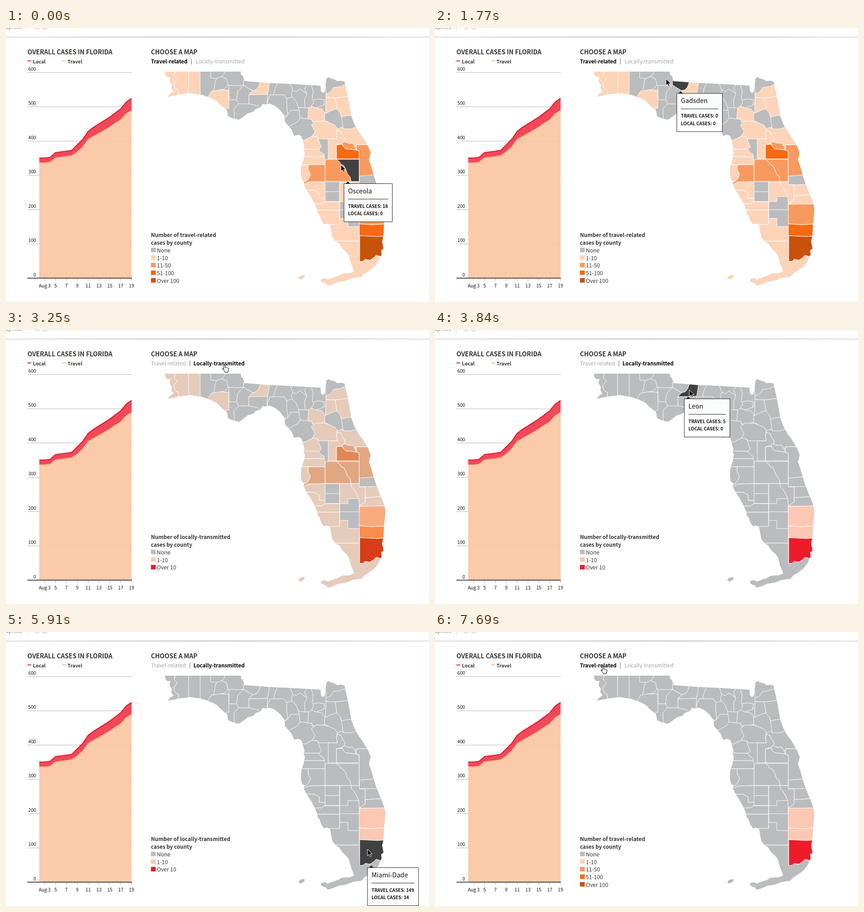
An HTML page for the animation above (7.99 s loop, 928 px wide and 603 px high).

```html
<!DOCTYPE html>
<html lang="en">
<head>
<meta charset="utf-8">
<title>Cases in Florida</title>
<style>
html, body { margin: 0; width: 100%; height: 100%; overflow: hidden; background: #fff; }
svg { display: block; width: 928px; height: 603px; font-family: "Noto Sans CJK SC", "Noto Sans CJK JP", "Open Sans", sans-serif; fill: #333; }
.head { font-size: 13.7px; font-weight: 700; }
.key { font-size: 10.7px; font-weight: 700; }
.axis { font-size: 10.2px; font-weight: 500; fill: #111; }
.tab { font-size: 11.87px; fill: #a4a4a4; }
.tab.over { fill: #555; }
.tab.on { font-size: 11.6px; font-weight: 700; fill: #000; }
.legend { font-size: 12px; }
.legend .title { font-size: 11.7px; font-weight: 700; }
.county path { stroke: #fff; stroke-width: 1; stroke-linejoin: round; }
.mesh { fill: none; stroke: #fff; stroke-width: 1; }
.tip .name { font-size: 14.2px; fill: #111; }
.tip .num { font-size: 9.9px; font-weight: 700; fill: #111; }
</style>
</head>
<body>
<svg id="stage" viewBox="0 0 928 603">
  <defs>
    <linearGradient id="rule">
      <stop offset="0" stop-color="#e4e4e4"/><stop offset=".5" stop-color="#c4c4c4"/><stop offset="1" stop-color="#e4e4e4"/>
    </linearGradient>
    <linearGradient id="shade" x2="0" y2="1">
      <stop offset="0" stop-color="#eee"/><stop offset="1" stop-color="#fff"/>
    </linearGradient>
    <clipPath id="land"><path id="coast"/></clipPath>
  </defs>

  <text x="35" y="2" text-anchor="end" font-size="12" fill="#888">Graphics</text>
  <path d="M46.500 0V7" stroke="#ddd"/>
  <rect x="63" y="-8" width="10" height="11" fill="#e6e6e6"/>
  <circle cx="85" cy="-4" r="8" fill="#e6e6e6"/>
  <rect y="20" width="928" height="4" fill="url(#shade)"/>
  <rect y="18.500" width="928" height="2" fill="url(#rule)"/>

  <text class="head" x="47" y="57.500">OVERALL CASES IN FLORIDA</text>
  <path d="M47 72.500h8" stroke="#e8192f" stroke-width="2"/>
  <text class="key" x="59" y="77.500">Local</text>
  <path d="M123 72.500h9" stroke="#fdbb8f" stroke-width="2"/>
  <text class="key" x="135" y="77.500">Travel</text>
  <g id="chart"></g>

  <text class="head" x="318" y="57.500">CHOOSE A MAP</text>
  <text class="tab" id="travelTab" x="318" y="77.500">Travel-related</text>
  <text class="tab" id="bar" x="406" y="77" text-anchor="middle" style="fill:#333">|</text>
  <text class="tab" id="localTab" x="523.500" y="77.500" text-anchor="end">Locally-transmitted</text>

  <g clip-path="url(#land)">
    <rect x="330" y="80" width="520" height="500" fill="#bbbcbe"/>
    <g class="county" id="counties"></g>
    <path class="mesh" id="mesh"/>
  </g>
  <g class="legend" id="travelKey"></g>
  <g class="legend" id="localKey"></g>

  <g class="tip" id="tip">
    <path d="M3.500 0L8.500-4.500 13.500 0Z" fill="#111"/>
    <rect id="box" height="84" fill="#fff" fill-opacity=".95" stroke="#222"/>
    <text class="name" id="name" x="9" y="21"></text>
    <path id="line" stroke="#222"/>
    <text class="num" id="travelNum" x="9" y="53"></text>
    <text class="num" id="localNum" x="9" y="69.500"></text>
  </g>
  <path id="arrow" fill="#000" stroke="#fff" d="M0 0V14.500L3.300 11.300 5.600 16.400 8 15.400 5.800 10.400H10.300Z"/>
  <path id="hand" fill="#fff" stroke="#000" d="M-2 10V1.500a1.500 1.500 0 0 1 3 0V6.500c.5-1 2.300-1 2.600.2 .8-.8 2.300-.5 2.500.6 1-.5 2.200 0 2.200 1.200V11.500L7 14.500V16.500H0V14.500L-5 9.500c-.8-1.300 .8-2.300 1.900-1.400Z"/>
</svg>
<script>
const $ = id => document.getElementById(id);
const add = (parent, tag, attrs, text = "") => {
  const el = document.createElementNS("http://www.w3.org/2000/svg", tag);
  for (const k in attrs) el.setAttribute(k, attrs[k]);
  el.textContent = text;
  return parent.appendChild(el);
};
const show = (id, on) => $(id).style.display = on ? "" : "none";

// Chart: one value per day from Aug 2 to Aug 19, as heights on the stage
const total = [286, 286, 284.5, 274, 272.5, 271, 269, 257, 245, 227.5, 218.5, 211, 203.5, 196, 187, 178, 163, 155];
const travel = [297, 297, 295.5, 286, 284.5, 283, 281, 273, 262, 245.5, 238.5, 232, 225, 218, 209.5, 202.5, 189, 181.5];
const dayX = i => 73 + i * 11.91;
const points = list => list.map((y, i) => `${dayX(i).toFixed(1)},${y}`);
const chart = $("chart");
for (let v = 0; v <= 600; v += 100) {
  const y = 550.5 - v * .7542;
  add(chart, "path", { d: `M47 ${y}H276`, stroke: "#b5b5b5" });
  add(chart, "text", { class: "axis", x: 66, y: y - 4, "text-anchor": "end" }, v);
}
const under = points(travel), upper = points(total);
add(chart, "polygon", { points: [...under, "275.5,550.5", "73,550.5"].join(" "), fill: "#fac6a3", opacity: .93 });
add(chart, "polygon", { points: [...upper, ...under.slice().reverse()].join(" "), fill: "#ef3a4d", opacity: .92 });
add(chart, "polyline", { points: under.join(" "), fill: "none", stroke: "#fdbb8f", "stroke-width": 2 });
add(chart, "polyline", { points: upper.join(" "), fill: "none", stroke: "#e8192f", "stroke-width": 2.2 });
add(chart, "path", { d: "M47 550.5H276", stroke: "#111", "stroke-width": 1.6 });
for (let day = 3; day <= 19; day += 2) {
  const x = dayX(day - 2);
  add(chart, "path", { d: `M${x} 551v5`, stroke: "#999" });
  add(chart, "text", { class: "axis", x, y: 571, "text-anchor": "middle" }, day == 3 ? "Aug 3" : day);
}

// Legends
const GREY = "#bbbcbe", DARK = "#414141";
const travelColors = [GREY, "#fdd4b8", "#f89a60", "#f56a12", "#c9520b"];
const localColors = [GREY, "#fcc8b4", "#ee1c2b"];
function legend(id, kind, labels, colors) {
  const g = $(id);
  add(g, "text", { class: "title", x: 318, y: 460 }, `Number of ${kind}`);
  add(g, "text", { class: "title", x: 318, y: 476.5 }, "cases by county");
  labels.forEach((label, i) => {
    const y = 483.5 + i * 16.7;
    add(g, "rect", { x: 318, y, width: 10.5, height: 10, fill: colors[i] });
    add(g, "text", { x: 331, y: y + 10.5 }, label);
  });
}
legend("travelKey", "travel-related", ["None", "1-10", "11-50", "51-100", "Over 100"], travelColors);
legend("localKey", "locally-transmitted", ["None", "1-10", "Over 10"], localColors);

// Coastline
const north = "349,96 515,96 516,103 520,106 522,112 523,117 577,121 624,123 690,127 691,139 695,143 699,141 701,128 703,111 708,108 713,111 721,113 727,117 735,116 743,118";
const east = "744,125 745,130 749,147 753,168 757,192 764,211 773,228 782,240 794,260 800,275 798,283 796,290 801,304 806,322 812,340 819,359 826,375 830,387 832,398 831,415 829,432 828,457 825,470 827,479 828,486 823,489 824,499 821,503 818,512 809,524 796,534 786,540 780,547 760,550 745,556 730,558 716,564 706,567 702,562 696,560 691,557 692,552 700,551 706,554 716,550 728,546 737,541 754,540 764,536";
const west = "762,530 757,518 753,501 748,494 738,485 731,474 723,469 716,460 713,444 711,433 704,430 698,432 692,424 688,412 684,408 683,400 677,386 668,369 659,356 653,343 655,338 649,333 647,320 648,304 653,290 656,275 653,268 655,262 651,247 648,238 642,235 632,237 627,224 612,207 611,193 601,180 590,171 578,166 571,168 563,167 558,175 548,178 543,184 530,188 520,196 511,202 498,199 487,194 485,181 474,172 462,160 450,154 430,147 405,143 381,146 355,151 361,144 368,140 363,133 364,125 359,117 361,108 354,108 349,102";
$("coast").setAttribute("d", `M${north} ${east} ${west}ZM642,549L646,545 655,544 654,549 648,553 643,553Z`);

// name: [travel level, local level, border]; seaward corners overshoot the coast
const counties = {
  "Escambia": [1, 0, "340,90 371,90 371,96 369,105 376,112 368,122 371,133 379,138 377,152 340,156"],
  "Santa Rosa": [1, 0, "371,90 400.5,90 400.5,152 377,152 379,138 371,133 368,122 376,112 369,105 371,96"],
  "Okaloosa": [1, 0, "400.5,90 426,90 426,152 400.5,152"],
  "Bay": [1, 0, "451,139 470,136 489,137 489,176 470,180 440,156"],
  "Gadsden": [0, 0, "521,115 558,119 554,130 549,136 541,138 531,132 521,126"],
  "Liberty": [0, 0, "521,126 531,132 541,138 533,147 533,167 510,167 506,158 508,140 517,130"],
  "Leon": [1, 0, "558,119 578,121 574,146 533,147 541,138 549,136 554,130"],
  "Wakulla": [0, 0, "533,147 574,146 572,172 560,178 552,171 533,167"],
  "Taylor": [0, 0, "579,147 610,147 616,155 616,172 618,192 608,200 580,178 572,170 575,158"],
  "Levy": [0, 0, "618,218 640,206 645,198 662,200 671,201 672,206 678,214 678,228 672,238 655,247 640,250 620,236"],
  "Alachua": [1, 0, "664,176 670,172 680,176 693,178 699,186 699,203 686,207 672,206 671,201 662,200"],
  "Duval": [1, 0, "718,131 733,129 743,125 755,125 755,150 735,153 722,154 702,153 702,145 710,142 716,136"],
  "Clay": [1, 0, "702,153 722,154 724,165 726,178 718,180 701,188"],
  "St. Johns": [1, 0, "722,154 755,150 765,192 747,193 736,196 734,188 726,178 724,165"],
  "Marion": [1, 0, "670,213 680,205 699,205 708,208 722,214 727,222 725,232 727,244 687,244 684,240 672,238 678,228"],
  "Volusia": [1, 0, "727,222 737,218 740,222 756,222 775,216 805,257 769,257 766,262 760,253 751,254 742,250 744,244 738,235 735,228 727,225"],
  "Lake": [1, 0, "727,225 735,228 738,235 744,244 742,250 737,254 725,257 725,288 707,288 707,244 727,244 725,232"],
  "Citrus": [1, 0, "635,241 655,247 672,238 684,240 687,250 692,262 686,267 640,266"],
  "Hernando": [1, 0, "640,266 686,267 690,273 698,278 698,283 640,283"],
  "Pasco": [1, 0, "640,283 698,283 700,290 700,301 640,301"],
  "Pinellas": [1, 0, "640,301 663,301 663,312 668,322 664,332 658,338 640,338"],
  "Hillsborough": [2, 0, "663,301 700,301 700,338 664,339 656,343 648,344 652,338 658,338 664,332 668,322 663,312"],
  "Polk": [2, 0, "700,291 706,289 725,289 731,294 735,300 741,303 745,310 749,321 755,328 757,338 700,338"],
  "Osceola": [2, 0, "725,289 775,289 775,338 757,338 755,328 749,321 745,310 741,303 735,300 731,294"],
  "Seminole": [2, 0, "737,254 742,250 751,254 760,253 766,262 769,269 757,267 745,266 741,262"],
  "Orange": [3, 0, "725,257 737,256 741,262 745,266 757,267 769,269 775,271 775,288 725,288"],
  "Brevard": [2, 0, "769,257 815,257 815,323 800,324 775,326 775,271 769,269"],
  "Manatee": [1, 0, "664,339 700,338 700,375 687,375 687,363 676,357 645,357 648,344 656,343"],
  "Sarasota": [1, 0, "645,357 676,357 687,363 687,375 700,375 700,382 692,387 660,388"],
  "Charlotte": [1, 0, "660,388 692,387 700,382 732,382 732,401 670,401"],
  "Lee": [1, 0, "670,401 732,401 732,432 690,440"],
  "Highlands": [1, 0, "732,338 757,338 758,345 763,350 768,358 774,371 750,371 750,382 732,382"],
  "Okeechobee": [1, 0, "757,338 775,338 775,345 788,345 788,378 780,384 775,387 774,371 768,358 763,350 758,345"],
  "St. Lucie": [1, 0, "788,345 825,344 835,366 788,369"],
  "Martin": [1, 0, "788,369 835,366 840,387 775,388 780,384 788,378"],
  "Palm Beach": [2, 1, "775,388 840,387 840,431 802,433 775,431"],
  "Broward": [3, 1, "775,431 802,433 840,431 840,457 815,459 775,457"],
  "Collier": [1, 0, "690,433 732,432 732,419 750,419 750,437 775,437 775,469 700,469"],
  "Monroe": [1, 0, "700,469 775,469 776,514 784,513 788,509 798,511 806,506 812,500 822,503 840,498 840,580 630,580 630,520"],
  "Miami-Dade": [4, 2, "776,457 815,459 840,457 840,500 822,503 812,500 806,506 798,511 788,509 784,513 776,514"]
};
const shapes = Object.entries(counties).map(([name, [a, b, border]]) => ({
  name, from: travelColors[a], to: localColors[b], el: add($("counties"), "path", { d: `M${border}Z` })
}));

// Borders between the remaining counties
$("mesh").setAttribute("d", [
  "449,90 449,110 462,111 473,107 478,102 482,90", "462,111 459,118 457,133 454,139",
  "473,107 484,112 487,126 478,135 470,136", "487,126 507,127 521,126", "489,126 489,158 506,158",
  "510,167 500,178 501,202", "596,121 590,134 587,147", "624,123 629,137 637,140 645,134 655,141 660,145",
  "629,137 626,146 628,152 616,155", "628,152 636,160 641,172 643,181 645,198", "611,195 618,192 625,181 643,181",
  "641,175 664,176", "660,125 655,133 660,145 655,157 656,175", "670,126 674,140 672,155 675,163 670,172",
  "674,158 686,156 699,158 697,170 680,176", "697,170 702,165", "702,145 701,127", "699,186 701,188",
  "734,188 736,196 738,210 740,222", "699,203 708,208", "700,338 732,338 732,400", "700,360 732,360", "700,382 732,382",
  "775,338 775,326", "732,400 775,400 775,387", "732,419 732,400", "788,345 775,345"
].map(s => "M" + s).join(""));

// name: [middle, bottom, travel cases, local cases]
const tips = {
  "Osceola": [750, 338, 18, 0], "Orange": [750, 288, 62, 0], "Lake": [725, 288, 3, 0], "Levy": [645, 240, 0, 0],
  "Taylor": [596, 200, 0, 0], "Wakulla": [553, 173, 0, 0], "Gadsden": [539, 139.5, 0, 0], "Leon": [555.5, 147, 5, 0],
  "Alachua": [683, 208, 5, 0], "Palm Beach": [803.5, 432, 26, 2], "Broward": [802, 458, 83, 2],
  "Miami-Dade": [801.5, 514, 149, 34], "Liberty": [520, 167, 0, 0], "Santa Rosa": [385.5, 149, 1, 0]
};

// Pointer: [time, x, y, county under it]
const moves = [
  [0, 735, 301, "Osceola"], [140, 735, 298, "Osceola"], [290, 734, 292, "Osceola"], [440, 732, 283, "Orange"],
  [590, 729, 273, "Orange"], [740, 724, 262, "Lake"], [880, 718, 253, "Lake"], [1030, 714, 247, "Lake"],
  [1180, 712, 244, "Lake"], [1330, 655, 200, "Levy"], [1480, 592, 158, "Taylor"], [1620, 540, 132, "Wakulla"],
  [1770, 507, 112, "Gadsden"], [1920, 490, 96], [2070, 483, 89], [2220, 481, 86], [2360, 480, 82], [2510, 480, 76.5],
  [3840, 558, 132, "Leon"], [3990, 685, 200, "Alachua"], [4140, 722, 262, "Lake"], [4280, 750, 316, "Osceola"],
  [4430, 768, 359, "Osceola"], [4580, 794, 408, "Palm Beach"], [4730, 797, 414, "Palm Beach"],
  [5180, 797, 420, "Palm Beach"], [5330, 796, 435, "Broward"], [5470, 795, 450, "Broward"], [5620, 794, 466, "Miami-Dade"],
  [5770, 793, 475, "Miami-Dade"], [5910, 793, 478, "Miami-Dade"], [6660, 608, 197, "Levy"], [6810, 523, 145, "Liberty"],
  [6950, 405, 108, "Santa Rosa"], [7100, 380, 89], [7240, 372, 82], [7390, 369, 75.5]
];
const fades = [[0, 0], [3110, .12], [3250, .37], [3400, .75], [3550, 1]];
const at = (rows, t) => rows.findLast(r => r[0] <= t);
const mix = (a, b, p) => "rgb(" + [1, 3, 5].map(i => {
  const u = parseInt(a.substr(i, 2), 16), v = parseInt(b.substr(i, 2), 16);
  return Math.round(u + (v - u) * p);
}) + ")";

function drawTip(name) {
  show("tip", name);
  if (!name) return;
  const [x, y, travelCases, localCases] = tips[name];
  const w = 94 + 6 * String(travelCases).length;
  $("tip").setAttribute("transform", `translate(${x - 8.5} ${y + 4.5})`);
  $("box").setAttribute("width", w);
  $("line").setAttribute("d", `M9 34H${w - 9}`);
  $("name").textContent = name;
  $("travelNum").textContent = `TRAVEL CASES: ${travelCases}`;
  $("localNum").textContent = `LOCAL CASES: ${localCases}`;
}

function draw(t) {
  const [, x, y, county] = at(moves, t);
  const fade = at(fades, t)[1];
  const local = t >= 2810 && t < 7690;
  const hand = (t >= 2510 && t < 3840) || t >= 7390;
  for (const s of shapes) s.el.style.fill = s.name == county ? DARK : mix(s.from, s.to, fade);
  drawTip(t >= 4430 && t < 4580 ? "" : county);
  show("travelKey", !local);
  show("localKey", local);
  $("travelTab").setAttribute("class", "tab " + (!local ? "on" : t >= 7390 ? "over" : ""));
  $("localTab").setAttribute("class", "tab " + (local ? "on" : t >= 2510 && t < 2810 ? "over" : ""));
  $("bar").setAttribute("x", local ? 403.5 : 406.5);
  show("hand", hand);
  show("arrow", !hand);
  $(hand ? "hand" : "arrow").setAttribute("transform", `translate(${x} ${y})`);
}

const start = performance.now();
(function tick() {
  draw((performance.now() - start) % 7990);
  requestAnimationFrame(tick);
})();
</script>
</body>
</html>
```
